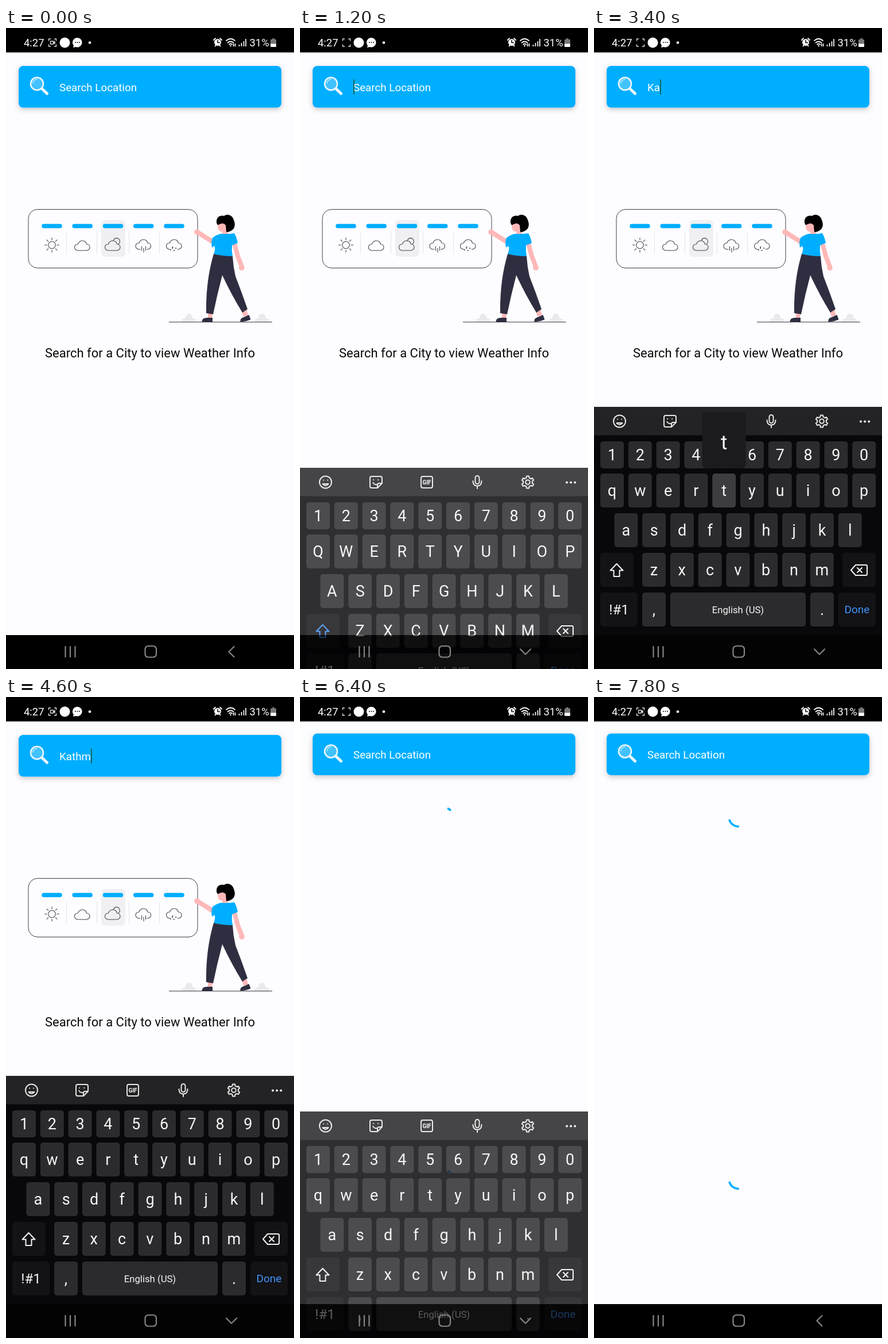
These frames come from a looping animation (502x1115 px, 8000 ms). An HTML page:

```html
<!DOCTYPE html>
<html lang="en">
<head>
<meta charset="utf-8">
<title>Weather search</title>
<style>
html, body { margin: 0; width: 100%; height: 100%; overflow: hidden; background: #fdfcff; }
svg { display: block; width: 502px; height: 1115px; font-family: Roboto, "Noto Sans", sans-serif; }
.line { fill: none; stroke-linecap: round; stroke-linejoin: round; }
.key { fill: #2b2a2d; }
.key.dark { fill: #131215; }
.key.down { fill: #3d3c3f; }
.mid { text-anchor: middle; fill: #f6f6f6; }
.skin { fill: #ffb8b8; }
</style>
</head>
<body>
<svg viewBox="0 0 502 1115">
  <defs>
    <filter id="shade" x="-10%" y="-40%" width="120%" height="190%">
      <feDropShadow dx="0" dy="3" stdDeviation="5" flood-color="#000" flood-opacity=".22"/>
    </filter>
    <path id="cloud" d="M-8 9h15c4 0 6-3 6-5.5 0-3-2-5.5-5.5-5.5-1-4-4-6-7.5-6-4 0-7 3-7.5 6-4 0-6 2.5-6 5.5 0 3 2.5 5.5 5.5 5.5z"/>
    <path id="bush" fill="#eaeaec" d="M-13 6q0-6 7-6 0-8 6-8t6 8q7 0 7 6z"/>
  </defs>
  <rect width="502" height="1115" fill="#fdfcff"/>

  <g id="header">
    <rect x="22" y="66" width="458" height="72.500" rx="8" fill="#00aeff" filter="url(#shade)"/>
    <path d="M62 105l9.500 9" stroke="#eef6fa" stroke-width="5" class="line"/>
    <circle cx="54" cy="97" r="11" fill="#42c2ff" stroke="#eaf6fc" stroke-width="2.600"/>
    <path d="M47 96q1-6 7-7" stroke="#c4ecff" stroke-width="1.500" class="line"/>
    <text id="query" x="93" y="109.500" font-size="18.800" fill="#fff"></text>
    <rect id="caret" y="89.500" width="1.800" height="26" fill="#17614f"/>
  </g>

  <g id="welcome">
    <rect x="39" y="315.500" width="295" height="102" rx="16" fill="none" stroke="#3f3d4a"/>
    <rect x="166" y="334" width="42" height="64" rx="7" fill="#f0f0f2"/>
    <path d="M66 344.500h28m25.200 0h28m25.300 0h28m25.200 0h28m25.300 0h28" stroke="#00aeff" stroke-width="7.500" class="line"/>
    <path d="M105.500 356v37m53-37v37m56-37v37m53-37v37" stroke="#e4e4e6"/>
    <g class="line" stroke="#45434e" stroke-width="1.100">
      <circle cx="80" cy="377.500" r="6.300"/>
      <g id="rays" transform="translate(80 377.500)"/>
      <use href="#cloud" x="133" y="378"/>
      <path d="M187 370a5.800 5.800 0 1 1 9 6"/>
      <use href="#cloud" x="186" y="378"/>
      <use href="#cloud" x="239.500" y="376"/>
      <path d="M236.500 380v7m3.500-4v7m3.500-10v7" stroke="#fdfcff" stroke-width="4"/>
      <path d="M236.500 380v7m3.500-4v7m3.500-10v7"/>
      <use href="#cloud" x="293" y="376"/>
      <path d="M289 386h7" stroke="#fdfcff" stroke-width="6"/>
      <path d="M290 383h.1m6 0h.1m-3.500 4h.1m-6-1h.1m3.500-5h.1" stroke-width="2"/>
    </g>
    <use href="#bush" x="319" y="505"/>
    <use href="#bush" x="446" y="505"/>
    <path d="M284 511.500h180" stroke="#3f3d4a" stroke-width="1.200"/>
    <g class="line" stroke="#ffb8b8" stroke-width="8">
      <path d="M335 356L362 373M399 378L404 397 411 415"/>
    </g>
    <circle class="skin" cx="333" cy="355" r="4.800"/>
    <circle class="skin" cx="411" cy="417" r="4.800"/>
    <path class="skin" d="M370 340l15-2 2 23h-10v-7c-5 1-8-4-8-9zM352 496h8l-1 9h-7zM411 493l8-4 3 11-8 2z"/>
    <path fill="#000" d="M367 339c-1-10 6-14 13-12 6-5 15-1 17 7 3 7 2 12-1 16-3 3-8 5-12 5l-1-12c-4-5-9-3-14 0z"/>
    <path fill="#00aeff" d="M374 358q13 1 24-1 4 7 6 17l-10 4q-1 10 1 19-17 1-33-4 4-9 1-14l-4 3q-2-10 1-17 6-5 14-7z"/>
    <path fill="#2f2e41" d="M362 393q16 4 33 4 1 18 5 35 11 28 21 57l-9 6q-18-29-35-65-9 34-16 68l-12-2q-1-56 13-103zM341.500 511q0-7 9-7h9.500v7zM408.500 511q-1-6 6-8l9-4 3 8q-8 4-18 4z"/>
    <text x="251" y="573" font-size="22" text-anchor="middle" fill="#0a0a0a">Search for a City to view Weather Info</text>
  </g>

  <g id="loading" class="line" stroke="#00aeff" stroke-width="3.600">
    <path class="arc" transform="translate(251.500 209)" stroke-linecap="butt"/>
    <path class="arc" transform="translate(251.500 839)" stroke-linecap="butt"/>
  </g>

  <rect y="1056" width="502" height="59"/>
  <g id="board">
    <rect y="659" width="502" height="460" fill="#08070a"/>
    <rect y="659" width="502" height="49.500" fill="#232224"/>
    <g class="line" stroke="#e6e6e6" stroke-width="2">
      <circle cx="44.500" cy="684" r="10.500"/>
      <path d="M39.500 687q5 6 10 0zM41 680.500h.1m7 0h.1"/>
      <path d="M125 674h15q3 0 3 3v9l-8 8h-10q-3 0-3-3v-14q0-3 3-3zM143 686h-5q-3 0-3 3v5M128 680h.1m8 0h.1m-9 5q3 4 6 3"/>
      <rect x="211" y="674" width="20" height="20" rx="3"/>
      <rect x="305.500" y="673" width="7" height="14" rx="3.500"/>
      <path d="M301.500 682q0 8.500 7.500 8.500t7.500-8.500M309 691v4"/>
      <path id="gear"/>
      <circle cx="397" cy="684" r="3.800"/>
      <path d="M465 684.500h.1m7 0h.1m7 0h.1" stroke-width="4"/>
    </g>
    <text x="221" y="688" font-size="10" font-weight="700" class="mid">GIF</text>
    <g id="keys"/>
    <path id="shift" class="line" stroke-width="2" d="M39.500 932l11 11.500h-6v10.500h-10v-10.500h-6z"/>
    <path class="line" stroke="#f2f2f2" stroke-width="2" d="M456 934h18q2 0 2 2v14q0 2-2 2h-18l-8-9zM459 939l8 8m0-8l-8 8"/>
    <g id="popup">
      <rect x="-38" y="-107" width="76" height="98" rx="8" fill="#1b1a1d"/>
      <text id="big" y="-42" font-size="35" class="mid"></text>
    </g>
  </g>
  <rect y="1056" width="502" height="59" opacity=".55"/>
  <g class="line" stroke="#858585" stroke-width="2.200">
    <path d="M103.500 1076v18m8.500-18v18m8.500-18v18"/>
    <rect x="242.500" y="1075" width="19.500" height="19.500" rx="5.500"/>
    <path id="back"/>
  </g>

  <rect width="502" height="42.500"/>
  <g fill="#fff" font-size="18.400">
    <text x="31" y="32">4:27</text>
    <text x="424.500" y="32">31%</text>
    <g class="line" stroke="#ddd" stroke-width="1.400">
      <path d="M74.500 22v-3h3m7 0h3v3m0 7v3h-3m-7 0h-3v-3"/>
      <path id="cam" d="M77.500 23h5v5h-5zM83 25l2-1.500v4z"/>
    </g>
    <circle cx="102.500" cy="25.500" r="9"/>
    <path d="M124.500 17a8.500 8.200 0 1 1-3 16l-4.500 1 1-3.500a8.500 8.200 0 0 1 6.500-13.500z"/>
    <path d="M121 25h.1m3.400 0h.1m3.400 0h.1" stroke="#222" stroke-width="2" class="line"/>
    <circle cx="146" cy="25.500" r="2.300"/>
    <circle cx="369" cy="25" r="6"/>
    <path d="M369 21.500v4h3.500" stroke="#000" stroke-width="1.500" class="line"/>
    <path d="M362 21l3-3m8 0l3 3M364.500 31.500l1-1.500m8 1.500l-1-1.500" stroke="#fff" stroke-width="1.800" class="line"/>
    <path d="M384 22q7.500-6.500 15 0M386.500 25.500q5-4 10 0M389 28.500q2.500-2 5 0M396.500 31.500v-4m3 0v4" stroke="#fff" stroke-width="1.700" class="line"/>
    <circle cx="391.500" cy="31" r="1.300"/>
    <path d="M406.500 32v-3m4 3v-6m4 6v-9m3.500 9v-13" stroke="#fff" stroke-width="1.700"/>
    <path fill="#777" d="M464 18h4v2h3v8h-10v-8h3z"/>
    <path d="M461 27.500h10v4.500q0 1-1 1h-8q-1 0-1-1z"/>
  </g>
</svg>
<script>
const $ = id => document.getElementById(id);
const make = (parent, tag, attrs, text = '') => {
  const el = document.createElementNS('http://www.w3.org/2000/svg', tag);
  for (const k in attrs) el.setAttribute(k, attrs[k]);
  el.textContent = text;
  return parent.appendChild(el);
};
const show = (el, on) => { el.style.display = on ? '' : 'none'; };
const polar = (r, deg) => {
  const a = deg * Math.PI / 180;
  return `${(r * Math.cos(a)).toFixed(2)} ${(r * Math.sin(a)).toFixed(2)}`;
};

for (let a = 0; a < 360; a += 45) make($('rays'), 'path', { d: `M${polar(9, a)}L${polar(12.5, a)}` });

// Gear outline: six teeth
let gear = '';
for (let i = 0; i < 6; i++)
  for (const [r, a] of [[8, -18], [10.8, -11], [10.8, 11], [8, 18]]) {
    const [x, y] = polar(r, i * 60 + 30 + a).split(' ').map(Number);
    gear += `${gear ? 'L' : 'M'}${397 + x} ${684 + y}`;
  }
$('gear').setAttribute('d', gear + 'z');

const keys = {};
function addKey(label, x, y, w = 41, h = 59, size = 27, kind = '', color = '#f6f6f6') {
  const cap = make($('keys'), 'rect', { x, y, width: w, height: h, rx: 5, class: 'key ' + kind });
  const text = make($('keys'), 'text',
    { x: x + w / 2, y: y + h / 2 + size * .36, 'font-size': size, class: 'mid', style: `fill:${color}` }, label);
  keys[label] = { cap, text, x: x + w / 2, y };
}
[['1234567890', 11, 719, 47], ['QWERTYUIOP', 11, 775], ['ASDFGHJKL', 35.4, 844], ['ZXCVBNM', 84, 913]]
  .forEach(([row, x, y, h]) => [...row].forEach((c, i) => addKey(c, x + i * 48.8, y, 41, h)));
addKey('', 11, 913, 58, 59, 27, 'dark');
addKey('', 433, 913, 58, 59, 27, 'dark');
addKey('!#1', 11, 982, 65, 59, 24, 'dark');
addKey(',', 84, 982);
addKey('English (US)', 133, 982, 236, 59, 16.7);
addKey('.', 377, 982);
addKey('Done', 426, 982, 65, 59, 19, 'dark', '#3f94f7');
const letters = Object.keys(keys).filter(k => /^[A-Z]$/.test(k));

// [time, text, held key]
const typing = [
  [900, '', ''], [2550, '', 'K'], [2750, 'K', ''], [3150, 'Ka', ''], [3350, 'Ka', 'T'],
  [3550, 'Kat', ''], [3700, 'Kat', 'H'], [4150, 'Kath', ''], [4350, 'Kath', 'M'],
  [4550, 'Kathm', ''], [4750, 'Kathm', 'A'], [4950, 'Kathma', 'N'], [5150, 'Kathman', 'D'],
  [5350, 'Kathmand', 'U'], [5500, 'Kathmandu', '']
];
const LOOP = 8000, STEP = 200, BOARD_IN = 1100, LOAD = 6285, BOARD_OUT = 6500;

// Bezier ease that runs over half of a spinner cycle
function ease(x) {
  if (x <= 0) return 0;
  if (x >= .5) return 1;
  let lo = 0, hi = 1;
  for (let i = 0; i < 20; i++) {
    const u = (lo + hi) / 2, v = 1 - u;
    if (.6 * v * v * u + .3 * v * u * u + .5 * u ** 3 < x) lo = u; else hi = u;
  }
  return lo * lo * (3 - 2 * lo);
}

function shiftedEase(x) {
  return x <= .5 ? 0 : ease(x - .5);
}

function drawSpinner(e) {
  const p = e / 1333 % 1;
  const base = -90 + 90 * p + e * 720 / 6665;
  const from = base + 270 * shiftedEase(p);
  const to = Math.max(base + 270 * ease(p), from + .5);
  const d = `M${polar(16.2, from)}A16.2 16.2 0 ${to - from > 180 ? 1 : 0} 1 ${polar(16.2, to)}`;
  document.querySelectorAll('.arc').forEach(el => el.setAttribute('d', d));
}

function drawKeyboard(t, text, held) {
  const open = t > BOARD_IN && t < BOARD_OUT;
  show($('board'), open);
  $('back').setAttribute('d', open ? 'M384 1080.5l9 9 9-9' : 'M397.500 1076l-9 9 9 9');
  if (!open) return;
  const drop = t < 1400 ? 106 * (1400 - t) / 200 : t > LOAD ? 62 * (t - LOAD) / 115 : 0;
  $('board').setAttribute('transform', `translate(0 ${drop})`);
  $('board').style.opacity = drop ? .84 : 1;
  const upper = text === '';
  for (const c of letters) {
    keys[c].text.textContent = upper ? c : c.toLowerCase();
    keys[c].cap.classList.toggle('down', c === held);
  }
  $('shift').setAttribute('stroke', upper ? '#3f94f7' : '#f2f2f2');
  show($('popup'), held);
  if (held) {
    $('popup').setAttribute('transform', `translate(${keys[held].x} ${keys[held].y})`);
    $('big').textContent = upper ? held : held.toLowerCase();
  }
}

function draw(now) {
  const t = Math.floor(now % LOOP / STEP) * STEP;
  const loading = t > LOAD;
  const [since, text, held] = typing.filter(s => s[0] <= t).pop() || [Infinity, '', ''];
  show($('welcome'), !loading);
  show($('loading'), loading);
  $('header').setAttribute('transform', `translate(0 ${loading ? -2.5 : 0})`);
  $('query').textContent = loading || !text ? 'Search Location' : text;
  const caret = !loading && t >= since && (t - since) % 1000 < 500;
  show($('caret'), caret);
  if (caret) $('caret').setAttribute('x', 93 + (text ? $('query').getComputedTextLength() : 0));
  drawKeyboard(t, text, loading ? '' : held);
  if (loading) drawSpinner(t - LOAD);
  const beat = t % 1000;
  show($('cam'), beat < 200 || beat >= 600);
}

const start = performance.now();
(function tick() {
  draw(performance.now() - start);
  requestAnimationFrame(tick);
})();
</script>
</body>
</html>
```
